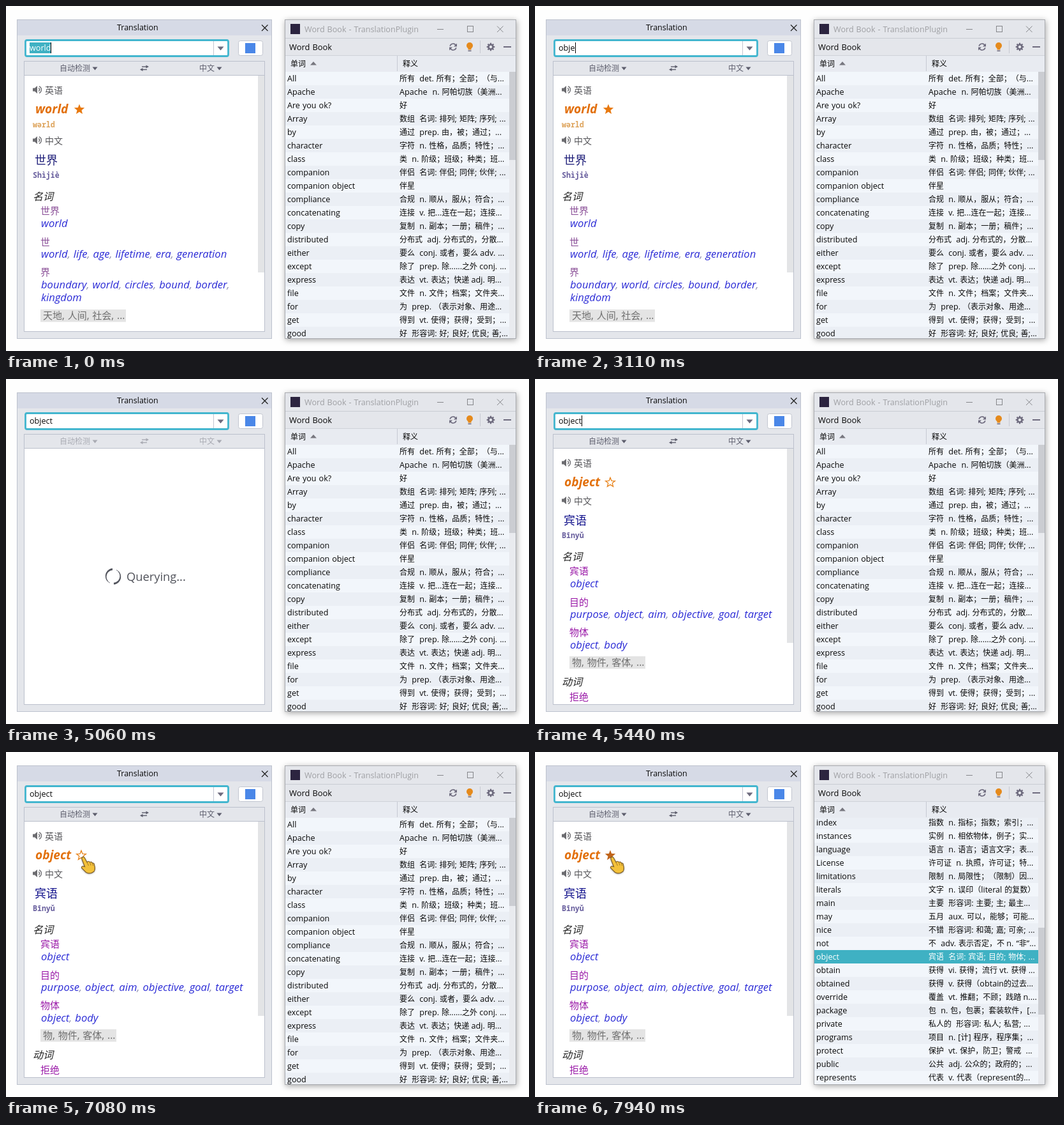
An HTML page with a canvas that plays this animation: 820 px wide and 540 px high, repeating every 8 s.

```html
<!DOCTYPE html>
<html lang="zh">
<head>
<meta charset="utf-8">
<title>Translation</title>
<style>
  html, body { margin: 0; width: 100%; height: 100%; overflow: hidden; background: #fefefe; }
  canvas { display: block; }
</style>
</head>
<body>
<canvas id="stage" width="820" height="540"></canvas>
<script>
const ctx = document.getElementById('stage').getContext('2d', { alpha: false });
const LOOP = 8000;
const SANS = '"Open Sans", "Noto Sans", sans-serif';
const MONO = '"Noto Sans Mono", "DejaVu Sans Mono", monospace';
const HAN = '"Noto Sans CJK SC", "Noto Sans CJK", sans-serif';
const TEAL = '#3fb1c3', ICON = '#6e6b7e', INK = '#080808';

// Times at which the caret flips; it starts visible.
const BLINKS = [160, 620, 1170, 1640, 2190, 2660, 3870, 4360, 4830, 5440, 5910, 6370, 7080, 7480, 7940];
const TYPE_START = 2660, TYPE_STEP = 150;
const QUERY_START = 4500, QUERY_END = 5380;
const STARRED = 7400, LISTED = 7480;

const WORDS_TOP = [
  ['All', '所有  det. 所有；全部；（与...'],
  ['Apache', 'Apache  n. 阿帕切族（美洲...'],
  ['Are you ok?', '好'],
  ['Array', '数组  名词: 排列; 矩阵; 序列; ...'],
  ['by', '通过  prep. 由，被；通过；...'],
  ['character', '字符  n. 性格，品质；特性；...'],
  ['class', '类  n. 阶级；班级；种类；班...'],
  ['companion', '伴侣  名词: 伴侣; 同伴; 伙伴; ...'],
  ['companion object', '伴星'],
  ['compliance', '合规  n. 顺从，服从；符合；...'],
  ['concatenating', '连接  v. 把...连在一起；连接...'],
  ['copy', '复制  n. 副本；一册；稿件；...'],
  ['distributed', '分布式  adj. 分布式的，分散...'],
  ['either', '要么  conj. 或者，要么 adv. ...'],
  ['except', '除了  prep. 除......之外 conj. ...'],
  ['express', '表达  vt. 表达；快递 adj. 明...'],
  ['file', '文件  n. 文件；档案；文件夹...'],
  ['for', '为  prep. （表示对象、用途...'],
  ['get', '得到  vt. 使得；获得；受到；...'],
  ['good', '好  形容词: 好; 良好; 优良; 善;...']
];
const WORDS_SCROLLED = [
  ['index', '指数  n. 指标；指数；索引；...'],
  ['instances', '实例  n. 相依物体，例子；实...'],
  ['language', '语言  n. 语言；语言文字；表...'],
  ['License', '许可证  n. 执照，许可证；特...'],
  ['limitations', '限制  n. 局限性；（限制）因...'],
  ['literals', '文字  n. 误印（literal 的复数）'],
  ['main', '主要  形容词: 主要; 主; 最主...'],
  ['may', '五月  aux. 可以，能够；可能...'],
  ['nice', '不错  形容词: 和蔼; 嘉; 可亲; ...'],
  ['not', '不  adv. 表示否定，不 n. “非”...'],
  ['object', '宾语  名词: 宾语; 目的; 物体; ...'],
  ['obtain', '获得  vi. 获得；流行 vt. 获得 ...'],
  ['obtained', '获得  v. 获得（obtain的过去...'],
  ['override', '覆盖  vt. 推翻；不顾；践踏 n....'],
  ['package', '包  n. 包，包裹；套装软件，[...'],
  ['private', '私人的  形容词: 私人; 私营; ...'],
  ['programs', '项目  n. [计] 程序，程序集；...'],
  ['protect', '保护  vt. 保护，防卫；警戒  ...'],
  ['public', '公共  adj. 公众的；政府的；...'],
  ['represents', '代表  v. 代表（represent的...']
];

const WORLD = {
  word: 'world', starX: 115, phonetic: 'wərld', speakerY: 211,
  target: '世界', pinyin: 'Shìjiè', navy: '#20207a', purple: '#8c5299',
  thumbEnd: 417, tag: ['天地, 人间, 社会, ...', 134, 475],
  headings: [['名词', 298], ['形容词', 516.5]],
  terms: [['世界', 320], ['世', 369], ['界', 416]],
  links: [['world', 346], ['world, life, age, lifetime, era, generation', 394],
    ['boundary, world, circles, bound, border,', 442], ['kingdom', 462]]
};
const OBJECT = {
  word: 'object', starX: 118, speakerY: 191,
  target: '宾语', pinyin: 'Bīnyǔ', navy: '#12128c', purple: '#9a1aa8',
  thumbEnd: 413, tag: ['物, 物件, 客体, ...', 119, 434],
  headings: [['名词', 278], ['动词', 474]],
  terms: [['宾语', 300], ['目的', 349], ['物体', 396], ['拒绝', 497]],
  links: [['object', 326], ['purpose, object, aim, objective, goal, target', 374], ['object, body', 422]]
};

function rect(x, y, w, h, color) {
  ctx.fillStyle = color;
  ctx.fillRect(x, y, w, h);
}

function frame(x, y, w, h, color) {
  ctx.strokeStyle = color;
  ctx.lineWidth = 1;
  ctx.strokeRect(x + .5, y + .5, w - 1, h - 1);
}

function rounded(x, y, w, h, r, fill, stroke, width) {
  ctx.beginPath();
  ctx.roundRect(x, y, w, h, r);
  ctx.fillStyle = fill;
  ctx.fill();
  ctx.strokeStyle = stroke;
  ctx.lineWidth = width;
  ctx.stroke();
}

function poly(points, color) {
  ctx.beginPath();
  points.forEach(([x, y]) => ctx.lineTo(x, y));
  ctx.closePath();
  ctx.fillStyle = color;
  ctx.fill();
}

function line(x1, y1, x2, y2, color, width = 1) {
  ctx.beginPath();
  ctx.moveTo(x1, y1);
  ctx.lineTo(x2, y2);
  ctx.strokeStyle = color;
  ctx.lineWidth = width;
  ctx.stroke();
}

function arc(x, y, r, from, to, color, width) {
  ctx.beginPath();
  ctx.arc(x, y, r, from, to);
  ctx.strokeStyle = color;
  ctx.lineWidth = width;
  ctx.stroke();
}

// Draws mixed text, with Han runs set slightly smaller; returns the end x.
function text(str, x, y, size, color, style = '', family = SANS) {
  ctx.fillStyle = color;
  ctx.wordSpacing = '0.7px';
  str.split(/([\u2e80-\uffef]+)/).forEach((run, i) => {
    if (!run) return;
    ctx.font = i % 2 ? `${style} ${size / 1.05}px ${HAN}` : `${style} ${size}px ${family}`;
    ctx.fillText(run, x, y);
    x += ctx.measureText(run).width;
  });
  return x;
}

const han = (str, x, mid, size, color, style) =>
  text(str, x, mid + size * .38, size * 1.05, color, style);

const downArrow = (x, y, r, color) => poly([[x - r, y - r / 2], [x + r, y - r / 2], [x, y + r / 2 + 1]], color);

function star(x, y, color, filled) {
  const outer = filled ? 8.6 : 7.8;
  ctx.beginPath();
  for (let i = 0; i < 10; i++) {
    const a = i * Math.PI / 5 - Math.PI / 2, r = i % 2 ? outer * .43 : outer;
    ctx.lineTo(x + r * Math.cos(a), y + r * Math.sin(a));
  }
  ctx.closePath();
  ctx.fillStyle = ctx.strokeStyle = color;
  ctx.lineWidth = 1.3;
  if (filled) ctx.fill(); else ctx.stroke();
}

function speaker(y) {
  const c = '#6c6c70';
  poly([[42, y - 2.5], [45, y - 2.5], [49, y - 6], [49, y + 6], [45, y + 2.5], [42, y + 2.5]], c);
  arc(49.5, y, 3, -1, 1, c, 1.4);
  arc(49.5, y, 6, -1.15, 1.15, c, 1.4);
}

function links(str, y) {
  let x = 55;
  str.split(/(, ?)/).forEach((part, i) => {
    if (part) x = text(part, x, y, 16.65, i % 2 ? '#9090b0' : '#2c2cd6', 'italic');
  });
}

function result(d, starred, starColor) {
  rect(395, 109, 10, d.thumbEnd - 109, '#e3e4e6');
  speaker(131);
  han('英语', 61, 131.5, 14, '#56565a');
  text(d.word, 46, 168, 19.2, '#e2700c', 'italic bold');
  star(d.starX, 162, starColor, starred);
  if (d.phonetic) text(d.phonetic, 42, 190, 11.6, '#dda35a', 'bold', MONO);
  speaker(d.speakerY - 1);
  han('中文', 61, d.speakerY, 14, '#56565a');
  han(d.target, 45, d.speakerY + 30, 18, d.navy);
  text(d.pinyin, 42, d.speakerY + 58, 11.6, '#665c9c', 'bold', MONO);
  d.headings.forEach(([s, y]) => han(s, 42, y, 16, '#222', 'italic'));
  d.terms.forEach(([s, y]) => han(s, 54, y, 15, d.purple));
  d.links.forEach(([s, y]) => links(s, y));
  const [label, width, top] = d.tag;
  rect(54, top, width, 19.5, '#e4e4e4');
  han(label, 58, top + 9.5, 15, '#707070');
}

function spinner(t) {
  const turn = Math.floor((t - 5060) / 79 + .01) * Math.PI / 6;
  for (const base of [0, Math.PI]) {
    for (let i = 0; i < 16; i++) {
      const a = turn + base - 1.1 + i * .16;
      arc(168, 309, 11.3, a, a + .18, '#4d4f58', .8 + 2.2 * i / 15);
    }
  }
  text('Querying...', 189, 316, 18.3, '#50525a');
}

function hand(dx, dy) {
  ctx.save();
  ctx.translate(dx, dy);
  ctx.beginPath();
  ctx.moveTo(119, 168);
  ctx.bezierCurveTo(118, 164, 122, 163, 123.5, 166);
  ctx.lineTo(127, 172.5);
  ctx.quadraticCurveTo(129.5, 170, 131.5, 172.5);
  ctx.quadraticCurveTo(134, 171, 135.5, 174);
  ctx.quadraticCurveTo(138.5, 173.5, 138.5, 177);
  ctx.quadraticCurveTo(140.5, 183, 138, 187);
  ctx.quadraticCurveTo(132, 192, 125.5, 188.5);
  ctx.lineTo(118.5, 181.5);
  ctx.quadraticCurveTo(118, 177.5, 123.5, 179.5);
  ctx.closePath();
  ctx.shadowColor = 'rgba(0,0,0,.4)';
  ctx.shadowBlur = 3;
  ctx.shadowOffsetY = 1;
  ctx.fillStyle = '#f3c13a';
  ctx.fill();
  ctx.shadowColor = 'transparent';
  ctx.strokeStyle = '#80602a';
  ctx.lineWidth = 1.2;
  ctx.stroke();
  line(127, 172.5, 129.5, 178, '#a87c28');
  line(131.5, 172.5, 133, 177.5, '#a87c28');
  line(135.5, 174, 136.5, 178, '#a87c28');
  ctx.restore();
}

function pointer(t) {
  if (t < 6600) return;
  const p = Math.min(3, Math.floor((t - 6600) / 83)) / 3;
  const left = 1 - p;
  hand(-125 * left ** 1.6, -21 * left + 27 * p * left);
}

function inputField(t) {
  rounded(30.5, 53.5, 318, 25, 2.5, '#fff', '#43b6cf', 2.8);
  line(325.5, 55, 325.5, 77, '#c3c6d0');
  downArrow(336.5, 66, 5, ICON);

  const typing = t >= TYPE_START;
  const count = Math.floor((t - TYPE_START) / TYPE_STEP) + 1;
  const value = typing ? 'object'.slice(0, count) : 'world';
  if (!typing) rect(37, 57, 33, 17, TEAL);
  const end = text(value, 37, 70, 12.6, typing ? INK : '#fff');
  const caretOn = BLINKS.filter(b => t >= b).length % 2 === 0;
  if (caretOn) rect(typing ? Math.round(end) : 70, 57, 1, 17, '#000');
}

function translationWindow(t) {
  const querying = t >= QUERY_START && t < QUERY_END;
  rect(17, 21, 400, 500, '#e4e6eb');
  rect(18, 22, 398, 24, '#d6dae6');
  frame(17, 21, 400, 500, '#bcc1cd');
  text('Translation', 174, 38, 12.5, INK);
  line(401, 29.5, 410.5, 39, '#222', 1.3);
  line(410.5, 29.5, 401, 39, '#222', 1.3);
  inputField(t);

  rounded(364.5, 54.5, 38, 23, 3, '#fff', '#c2c6d0', 1);
  rect(375, 58, 16, 16, '#4a87e8');

  rect(28, 86, 378, 424, '#fff');
  rect(29, 87, 376, 21, '#e4e6eb');
  frame(28, 86, 378, 424, '#bbc0cc');
  line(28, 108.5, 406, 108.5, '#bbc0cc');
  const tone = querying ? '#a9abb3' : '#5c5d6c';
  han('自动检测', 84, 97.5, 12, tone);
  downArrow(139.5, 97.5, 4, tone);
  han('中文', 303, 97.5, 12, tone);
  downArrow(334.5, 97.5, 4, tone);
  line(213, 95, 220, 95, tone, 1.4);
  poly([[219.5, 92.5], [224, 95], [219.5, 97.5]], tone);
  line(214, 99.5, 221, 99.5, tone, 1.4);
  poly([[214.5, 97], [210, 99.5], [214.5, 102]], tone);

  ctx.save();
  ctx.beginPath();
  ctx.rect(29, 109, 376, 400);
  ctx.clip();
  if (querying) spinner(t);
  else if (t < QUERY_START) result(WORLD, true, '#e8790f');
  else result(OBJECT, t >= STARRED, t >= STARRED ? '#c0641a' : '#e8851f');
  ctx.restore();
}

function toolIcons() {
  arc(701, 64, 5, -2.9, -.5, ICON, 1.7);
  arc(701, 64, 5, .25, 2.65, ICON, 1.7);
  poly([[707, 58.5], [707, 63.5], [702, 63.5]], ICON);
  poly([[695, 69.5], [695, 64.5], [700, 64.5]], ICON);

  ctx.fillStyle = '#e58a1c';
  ctx.beginPath();
  ctx.arc(727, 62, 5, 0, 7);
  ctx.fill();
  rect(724.5, 65, 5, 3.5, '#e58a1c');
  rect(724.5, 69.5, 5, 1.5, ICON);

  line(743.5, 54, 743.5, 74, '#c6c9d1');
  arc(760, 64, 3.5, 0, 7, ICON, 2.6);
  for (let i = 0; i < 8; i++) {
    const a = i * Math.PI / 4, c = Math.cos(a), s = Math.sin(a);
    line(760 + 4 * c, 64 + 4 * s, 760 + 6.3 * c, 64 + 6.3 * s, ICON, 2.2);
  }
  rect(780, 63, 12, 2, ICON);
}

function table(t) {
  const scrolled = t >= LISTED;
  const rows = scrolled ? WORDS_SCROLLED : WORDS_TOP;
  const first = scrolled ? 25 : 0, top = scrolled ? 100 : 103;
  ctx.save();
  ctx.beginPath();
  ctx.rect(438, 103, 351, 417);
  ctx.clip();
  rows.forEach(([word, meaning], i) => {
    const y = top + i * 21, selected = scrolled && word === 'object';
    const color = selected ? '#fff' : INK;
    rect(438, y, 351, 21, selected ? TEAL : (first + i) % 2 ? '#ebeff5' : '#f2f6fb');
    text(word, 441, y + 15, 12.6, color);
    text(meaning, 617, y + 15, 12.6, color);
  });
  ctx.restore();
  rect(789, 103, 10, 417, '#e9ebef');
  rect(789, scrolled ? 275 : 103, 10, scrolled ? 136 : 138, '#cbcdd2');
}

function wordBookWindow(t) {
  ctx.save();
  ctx.shadowColor = 'rgba(0,0,0,.35)';
  ctx.shadowBlur = 9;
  ctx.shadowOffsetX = 1;
  ctx.shadowOffsetY = 2;
  rect(437, 21, 363, 500, '#e4e6eb');
  ctx.restore();
  rect(446, 28, 15, 16, '#2c2440');
  text('Word Book - TranslationPlugin', 468, 41, 12.6, '#9fa0a4');
  line(676, 36.5, 686, 36.5, '#85868a');
  frame(723, 31, 10, 10, '#85868a');
  line(770, 31.5, 779.5, 41, '#85868a');
  line(779.5, 31.5, 770, 41, '#85868a');
  line(438, 50.5, 799, 50.5, '#c9ccd3');
  text('Word Book', 444, 69, 12.9, INK);
  toolIcons();

  rect(438, 77, 361, 26, '#e8ebf1');
  line(438, 77.5, 799, 77.5, '#cfd2d9');
  han('单词', 446, 90.5, 12, INK);
  poly([[477, 92.5], [487, 92.5], [482, 87]], '#77777f');
  line(613.5, 78, 613.5, 102, '#c6cad2');
  han('释义', 622, 90.5, 12, INK);
  table(t);
  frame(437, 21, 363, 500, '#a9abb0');
}

const start = performance.now();

function draw() {
  const t = (performance.now() - start) % LOOP;
  rect(0, 0, 820, 540, '#fefefe');
  translationWindow(t);
  wordBookWindow(t);
  pointer(t);
  requestAnimationFrame(draw);
}
draw();
</script>
</body>
</html>
```
